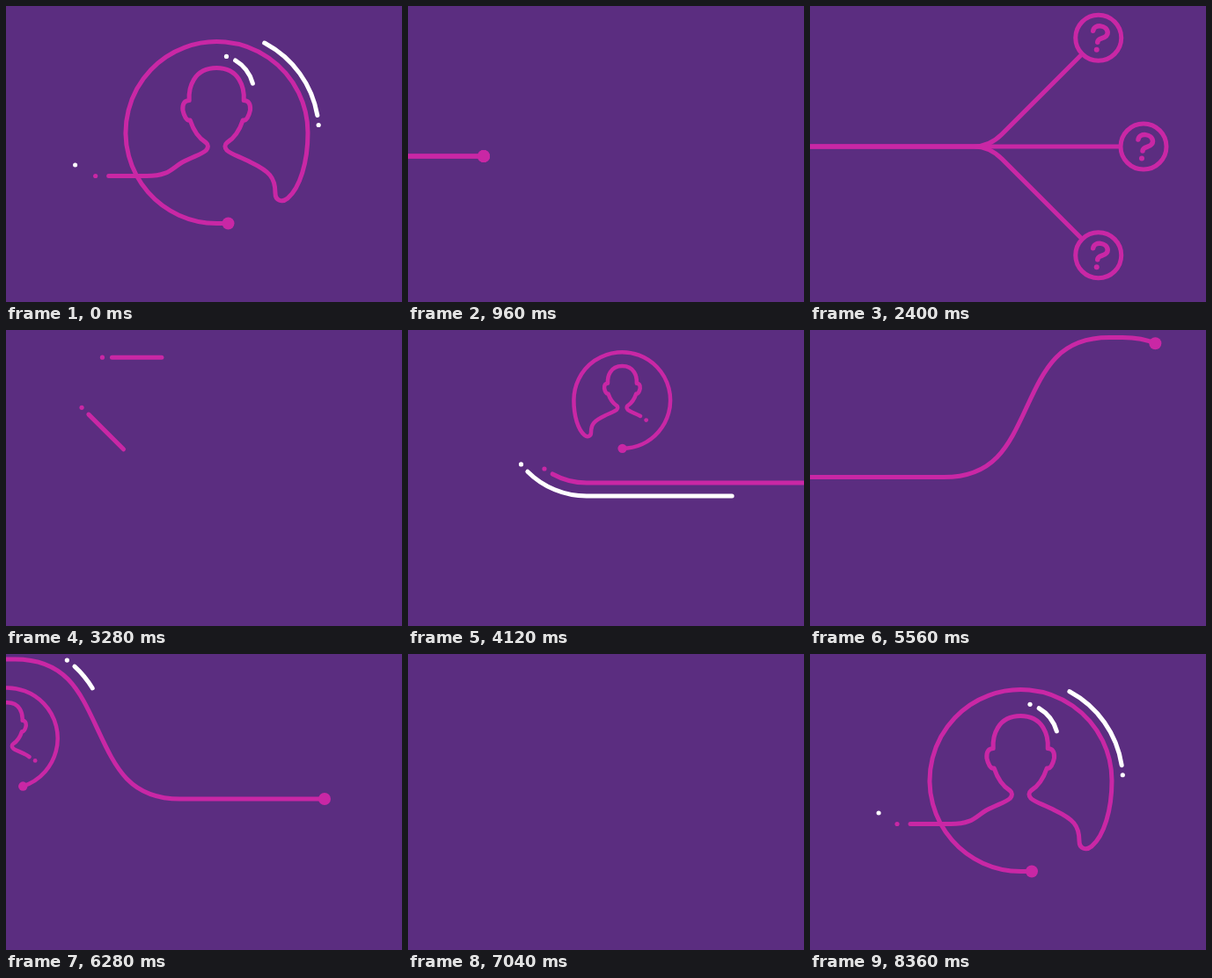
Animation, 450 px wide and 337 px high, one loop 8.4 s. Source, as an HTML page:

```html
<!DOCTYPE html>
<html lang="en">
<head>
<meta charset="utf-8">
<title>Line journey</title>
<style>
  html, body { margin: 0; width: 100%; height: 100%; overflow: hidden; background: #5b2d80; }
  svg { display: block; width: 100vw; height: 100vh; }
  path { fill: none; stroke-linecap: round; stroke-linejoin: round; }
</style>
</head>
<body>
<svg id="stage" viewBox="0 0 450 337"><g id="world"></g></svg>
<script>
const LOOP = 8400, STEP = 40, PINK = '#c927a5', WHITE = '#fff';
const stage = document.getElementById('stage');
const world = document.getElementById('world');

const easeIn = u => u * u;
const easeOut = u => 1 - (1 - u) ** 2;
const smooth = u => u * u * (3 - 2 * u);

function set(el, attrs) {
  for (const k in attrs) el.setAttribute(k, attrs[k]);
}
function add(parent, tag, attrs) {
  const el = document.createElementNS('http://www.w3.org/2000/svg', tag);
  set(el, attrs);
  return parent.appendChild(el);
}
function polar(x, y, r, deg) {
  const a = deg * Math.PI / 180;
  return [x + r * Math.cos(a), y + r * Math.sin(a)];
}

// Each key is [time, value a, value b, easing into this key].
function sample(keys, t) {
  const i = keys.findIndex(k => t < k[0]);
  if (i <= 0) return keys[i ? keys.length - 1 : 0].slice(1, 3);
  const [t0, a0, b0] = keys[i - 1], [t1, a1, b1, ease = u => u] = keys[i];
  const u = ease((t - t0) / (t1 - t0));
  return [a0 + (a1 - a0) * u, b0 + (b1 - b0) * u];
}

// Arc pieces on a circle that pass through the given angles.
function arc(x, y, r, degs, open = 'M') {
  return degs.slice(1).map((d, i) => {
    const turn = d - degs[i];
    const cmd = `A${r} ${r} 0 ${+(Math.abs(turn) > 180)} ${+(turn > 0)} ${polar(x, y, r, d)}`;
    return i ? cmd : `${open}${polar(x, y, r, degs[0])} ${cmd}`;
  });
}

// S-shaped step, symmetric about its middle.
function sCurve(w, h) {
  return `c${0.61 * w} 0 ${0.78 * w} ${0.44 * h} ${w} ${h}` +
         `c${0.22 * w} ${0.56 * h} ${0.39 * w} ${h} ${w} ${h}`;
}

// A line running along a path. Keys hold tail and head as piece numbers,
// where 2.5 is the middle of the third piece.
const snakes = [];
function snake(pieces, keys, { parent = world, color = PINK, w = 5, head = 7, tail = 2.6, gap = 11 } = {}) {
  const line = add(parent, 'path', { stroke: color, 'stroke-width': w });
  const marks = [0];
  pieces.forEach((p, i) => {
    line.setAttribute('d', pieces.slice(0, i + 1).join(' '));
    marks.push(line.getTotalLength());
  });
  const toLength = m => {
    const i = Math.min(Math.floor(m), pieces.length - 1);
    return marks[i] + (marks[i + 1] - marks[i]) * (m - i);
  };
  snakes.push({
    line, gap, total: marks[pieces.length],
    keys: keys.map(([t, a, b, ease]) => [t, toLength(a), toLength(b), ease]),
    headDot: add(parent, 'circle', { r: head, fill: color }),
    tailDot: add(parent, 'circle', { r: tail, fill: color })
  });
}

function placeDot(dot, line, at, shown) {
  dot.style.display = shown ? '' : 'none';
  if (!shown) return;
  const p = line.getPointAtLength(at);
  set(dot, { cx: p.x, cy: p.y });
}

function drawSnake(s, t) {
  const [a, b] = sample(s.keys, t < s.keys[0][0] ? t + LOOP : t);
  const on = b - a > 0.05;
  s.line.style.display = on ? '' : 'none';
  set(s.line, { 'stroke-dasharray': `${b - a} ${s.total + 20}`, 'stroke-dashoffset': -a });
  placeDot(s.headDot, s.line, b, on && b < s.total - 0.1);
  placeDot(s.tailDot, s.line, a - s.gap, on && a > s.gap);
}

// White stroke that runs in, is fully seen at time t and runs out.
function accent(pieces, t, parent = world, opts = {}) {
  snake(pieces, [[t - 420, 0, 0], [t, 1, 2, easeOut], [t + 450, 3, 3, easeIn]],
    { parent, color: WHITE, head: 0, ...opts });
}

// Person inside a ring, one stroke. The half profile runs from shoulder
// to crown as [distance from the axis, y] and is mirrored.
const AXIS = 239.2;
const half = [
  [39, 178], [27, 171.5], [17, 169], [12, 164.5], [9, 161], [9, 158], [12, 155.5],
  [21, 150], [26, 142], [30, 130], [34, 131], [37, 125], [38.3, 118.5],
  [39, 111], [36, 107.5], [31, 107.5], [32, 93], [26, 70.5], [0, 70.5]
];
const side = (pts, sign) => 'C' + pts.slice(1).map(([d, y]) => [AXIS + sign * d, y]).join(' ');
const ring = arc(239.5, 144, 103.5, [0, -221, -270], 'L');
const person = [
  'M-30 193.5 H114',
  'H160 C185 193.5 188 185 200.2 178',
  side(half, -1) + side([...half].reverse(), 1) +
    'C299 188 306 195 306 213 C306 222 314 224 320 219 C334 207 343 178 343 144' + ring[0],
  ring[1] + 'H252',
  'C330 246 380 171 480 171'
];

// Small portrait: drawn in until t, completed, then cleared once out of view.
function badge(x, y, s, flip, color, t, tail, head) {
  const g = add(world, 'g', { transform: `translate(${x} ${y}) scale(${flip ? -s : s} ${s}) translate(-240 -144)` });
  snake(person, [[t - 500, 1.6, 1.6], [t, tail, head], [t + 240, 2, 3.87, easeOut], [t + 640, 2, 3.87], [t + 680, 4, 4]],
    { parent: g, color, w: 4.5 / s, head: 5.2 / s, tail: 2.4 / s, gap: 8 / s });
}

// Opening portrait
snake(person, [[7640, 0, 0], [8360, 1, 4, easeOut], [9240, 5, 5, easeIn]], { parent: stage, gap: 15 });
accent(arc(240.5, 144, 115, [40, -8.6, -61.7, -150]), 8360, stage);
accent(arc(237.5, 100, 44.5, [-120, -59.5, -16, 20]), 8360, stage);
accent(['M-20 181 H78', 'h.1', 'H150'], 8360, stage, { tail: 0 });

// Three-way split into questions
const FORK = [215, 171], SPREAD = [-45, 0, 45];
const questions = SPREAD.map(deg => {
  const at = r => polar(...FORK, r, deg);
  snake(['M-40 171 H86', `H197 Q${FORK} ${at(20)} L${at(148)}`],
    [[840, 0, 0], [960, 0, 1], [1480, 0, 2, smooth], [2760, 0, 2], [3440, 2, 2, smooth]]);
  const g = add(world, 'g', { transform: `translate(${at(175)})` });
  const q = add(g, 'g', { stroke: PINK, 'stroke-width': 5 });
  add(q, 'circle', { r: 26, fill: 'none' });
  add(q, 'path', { d: 'M-6 -8 C-5 -16 10 -15 10.5 -6 C10.5 2 -1 -1 -1 5', 'stroke-width': 5.5 });
  add(q, 'circle', { cx: -2, cy: 13.5, r: 3, fill: PINK, stroke: 'none' });
  return q;
});
const popKeys = [[1440, 0, 0], [1640, 1.06, 0, easeOut], [1760, 1, 0, smooth], [2760, 1, 0], [3000, 0, 0, easeIn]];

// Long line: bend, loop, hump
const bend = arc(403, 244, 80, [135, 119, 90], `M${polar(...FORK, 148, 45)} L`);
const loop = arc(798.5, 399.5, 75.5, [-90, -24.6, 270], 'L');
snake([
  bend[0],
  bend[1] + loop[0].split('A')[0],
  'A' + loop[0].split('A')[1],
  loop[1] + 'H903',
  'H954' + sCurve(94, -79.5) + 'h15' + sCurve(94, 79.5) + 'H1509',
  'H1528'
], [[3440, 0, 0], [4120, 1, 1.75, smooth], [4880, 3, 4], [6280, 4.3, 5], [6520, 4.6, 6, easeOut], [6980, 6, 6, smooth]]);

const under = arc(403, 244, 95, [160, 135, 90]);
accent([under[0], under[1] + 'H568', 'H760'], 4120);
accent(arc(798.5, 399.5, 92.5, [-60, 41, 156.7, 260]), 4880);
accent(arc(1150, 255, 111, [-110, -47.6, -31, -10]), 6280);

badge(443, 230, 0.53, true, PINK, 4120, 2, 3.87);
badge(797, 397.5, 0.525, false, WHITE, 4880, 2, 3);
badge(1148, 255, 0.555, true, PINK, 6280, 1.92, 3.55);

const camera = [
  [1800, 0, 0], [2400, 11, 11, easeIn], [2700, 22, 20], [3400, 200, 150, smooth],
  [4120, 200, 150], [4880, 476, 154], [6280, 1147, 159], [6520, 1165, 159, easeOut]
];

function frame(now) {
  const t = Math.floor((now % LOOP) / STEP) * STEP;
  const [x, y] = sample(camera, t);
  world.setAttribute('transform', `translate(${-x} ${-y})`);
  const [pop] = sample(popKeys, t);
  questions.forEach(q => q.setAttribute('transform', `scale(${pop})`));
  snakes.forEach(s => drawSnake(s, t));
}

const start = performance.now();
(function tick() {
  frame(performance.now() - start);
  requestAnimationFrame(tick);
})();
</script>
</body>
</html>
```
